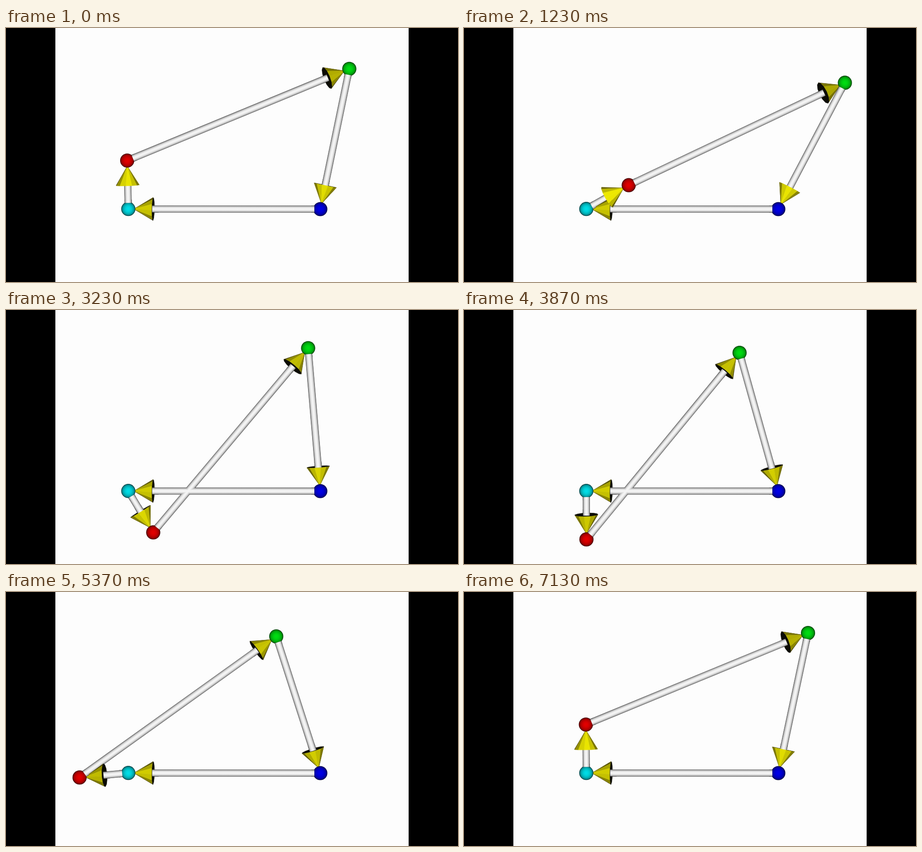
Write an HTML page with a canvas that moves like this. It is 998x561 px and loops after 7160 ms.

```html
<!DOCTYPE html>
<html>
<head>
<meta charset="utf-8">
<style>
html, body { margin: 0; width: 100%; height: 100%; overflow: hidden; background: #000; }
canvas { display: block; background: #fdfdfd; }
</style>
</head>
<body>
<canvas id="stage" width="998" height="561"></canvas>
<script>
const ctx = document.getElementById('stage').getContext('2d');
const LOOP = 7160, STEPS = 215;

// Mechanism, in plane units around the stage centre
const CRANK = 106.2, COUPLER = 531.5, ROCKER = 318.6;
const PIVOT = [-227.4, 118.9], ANCHOR = [196.1, 120.7];

const BALL = 15.6, ROD = 15.6, ROD_EXIT = 13.3;
const TIP = 12, BASE = 54, BASE_R = 25.3, SIDES = 12;

// Slightly turned perspective camera
const CX = 499, CY = 280, DIST = 1047, YAW = 0.04, SKEW = 3e-5;

// Crank angle in degrees clockwise from up: [step, angle]
const KEYS = [[0, -1.3], [37, 60.7], [67, 104.6], [97, 149.2], [134, 211.4], [161, 264.9], [214, 359.5]];

function project([x, y, z = 0]) {
  const w = 1 + SKEW * x - z / DIST;
  return [CX + (x + YAW * z) / w, CY + y / w];
}

function crankAngle(step) {
  const last = KEYS.length - 1;
  const key = i => i < 0 ? [KEYS[last - 1][0] - 214, KEYS[last - 1][1] - 360.8]
    : i > last ? [KEYS[1][0] + 214, KEYS[1][1] + 360.8] : KEYS[i];
  const rate = i => (key(i + 1)[1] - key(i)[1]) / (key(i + 1)[0] - key(i)[0]);
  const slope = i => {
    const before = key(i)[0] - key(i - 1)[0], after = key(i + 1)[0] - key(i)[0];
    return (rate(i - 1) * after + rate(i) * before) / (before + after);
  };
  let i = 0;
  while (i < last - 1 && step >= key(i + 1)[0]) i++;
  const [s0, a0] = key(i), [s1, a1] = key(i + 1);
  const h = s1 - s0, u = (step - s0) / h, v = 1 - u;
  return a0 * v * v * (1 + 2 * u) + a1 * u * u * (3 - 2 * u)
    + h * u * v * (v * slope(i) - u * slope(i + 1));
}

function joints(step) {
  const t = crankAngle(step) * Math.PI / 180;
  const red = [PIVOT[0] + CRANK * Math.sin(t), PIVOT[1] - CRANK * Math.cos(t)];
  const dx = red[0] - ANCHOR[0], dy = red[1] - ANCHOR[1], d = Math.hypot(dx, dy);
  const bend = Math.acos((d * d + ROCKER ** 2 - COUPLER ** 2) / (2 * d * ROCKER));
  const a = Math.atan2(dy, dx) + bend;
  const green = [ANCHOR[0] + ROCKER * Math.cos(a), ANCHOR[1] + ROCKER * Math.sin(a)];
  return { red, green };
}

const direction = (a, b) => {
  const d = Math.hypot(b[0] - a[0], b[1] - a[1]);
  return [(b[0] - a[0]) / d, (b[1] - a[1]) / d];
};
const along = (p, dir, s) => [p[0] + dir[0] * s, p[1] + dir[1] * s];

function rod(a, b) {
  const p = project(a), q = project(b), [ux, uy] = direction(p, q);
  const r = ROD / 2, nx = -uy * r, ny = ux * r;
  const fill = ctx.createLinearGradient(p[0] - nx, p[1] - ny, p[0] + nx, p[1] + ny);
  for (let i = -10; i <= 10; i++) {
    const g = Math.round(40 + 205 * Math.sqrt(1 - i * i / 100));
    fill.addColorStop((i + 10) / 20, `rgb(${g},${g},${g})`);
  }
  ctx.strokeStyle = fill;
  ctx.lineWidth = ROD;
  ctx.beginPath();
  ctx.moveTo(...p);
  ctx.lineTo(...q);
  ctx.stroke();
}

function ball(centre, color) {
  const [x, y] = project(centre);
  const fill = ctx.createRadialGradient(x, y, 0, x, y, BALL);
  for (let i = 0; i <= 8; i++) {
    const light = 0.18 + 0.74 * Math.sqrt(1 - i * i / 64);
    fill.addColorStop(i / 8, `rgb(${color.map(c => Math.round(c * light))})`);
  }
  ctx.fillStyle = fill;
  ctx.beginPath();
  ctx.arc(x, y, BALL, 0, 7);
  ctx.fill();
}

function polygon(points, color) {
  ctx.beginPath();
  points.forEach(p => ctx.lineTo(...project(p)));
  ctx.closePath();
  ctx.fillStyle = ctx.strokeStyle = color;
  ctx.lineWidth = 0.6;
  ctx.fill();
  ctx.stroke();
}

function cone(from, to) {
  const dir = direction(from, to), tip = along(to, dir, -TIP), base = along(to, dir, -BASE);
  const rim = i => {
    const f = i * 2 * Math.PI / SIDES, c = BASE_R * Math.cos(f);
    return [base[0] - dir[1] * c, base[1] + dir[0] * c, BASE_R * Math.sin(f)];
  };
  const view = [-YAW * DIST - base[0], -base[1], DIST], len = Math.hypot(...view);
  const half = Math.atan(BASE_R / (BASE - TIP));
  const faces = [];
  for (let i = 0; i < SIDES; i++) {
    const f = (i + 0.5) * 2 * Math.PI / SIDES;
    const c = Math.cos(half) * Math.cos(f), s = Math.sin(half);
    const normal = [s * dir[0] - c * dir[1], s * dir[1] + c * dir[0], Math.cos(half) * Math.sin(f)];
    const light = normal.reduce((sum, n, k) => sum + n * view[k], 0) / len;
    if (light <= 0) continue;
    const g = Math.round(30 + 230 * light);
    faces.push({ z: Math.sin(f), points: [tip, rim(i), rim(i + 1)], color: `rgb(${g},${g - 5},0)` });
  }
  const rimPoints = Array.from({ length: SIDES }, (_, i) => rim(i));
  const open = dir[0] * view[0] + dir[1] * view[1] < 0;
  return { faces, rimPoints, open, base, dir };
}

function draw(step) {
  const { red, green } = joints(step);
  const links = [[ANCHOR, PIVOT], [PIVOT, red], [red, green], [green, ANCHOR]];
  const cones = links.map(([a, b]) => cone(a, b));

  ctx.clearRect(0, 0, 998, 561);
  // Rods share one plane, so the brighter surface is the nearer one
  ctx.globalCompositeOperation = 'lighten';
  links.forEach(([a, b]) => rod(a, along(b, direction(a, b), -BASE + 2)));
  ctx.globalCompositeOperation = 'source-over';

  cones.filter(c => c.open).forEach(c => {
    polygon(c.rimPoints, '#0c0c04');
    rod(along(c.base, c.dir, -12), along(c.base, c.dir, 2));
  });
  cones.flatMap(c => c.faces).sort((a, b) => a.z - b.z)
    .forEach(f => polygon(f.points, f.color));

  ball(PIVOT, [0, 240, 250]);
  ball(ANCHOR, [0, 0, 250]);
  ball(red, [245, 0, 0]);
  ball(green, [0, 240, 20]);
  links.forEach(([a, b]) => {
    const dir = direction(a, b);
    rod(along(a, dir, ROD_EXIT), along(a, dir, ROD_EXIT + 7));
  });

  ctx.fillStyle = '#000';
  ctx.fillRect(0, 0, 109, 561);
  ctx.fillRect(889, 0, 109, 561);
}

const start = performance.now();
function tick() {
  const t = (performance.now() - start) % LOOP;
  draw(Math.min(STEPS - 1, Math.floor((Math.floor(t / 10) + 0.5) * 0.3)));
  requestAnimationFrame(tick);
}
tick();
</script>
</body>
</html>
```
